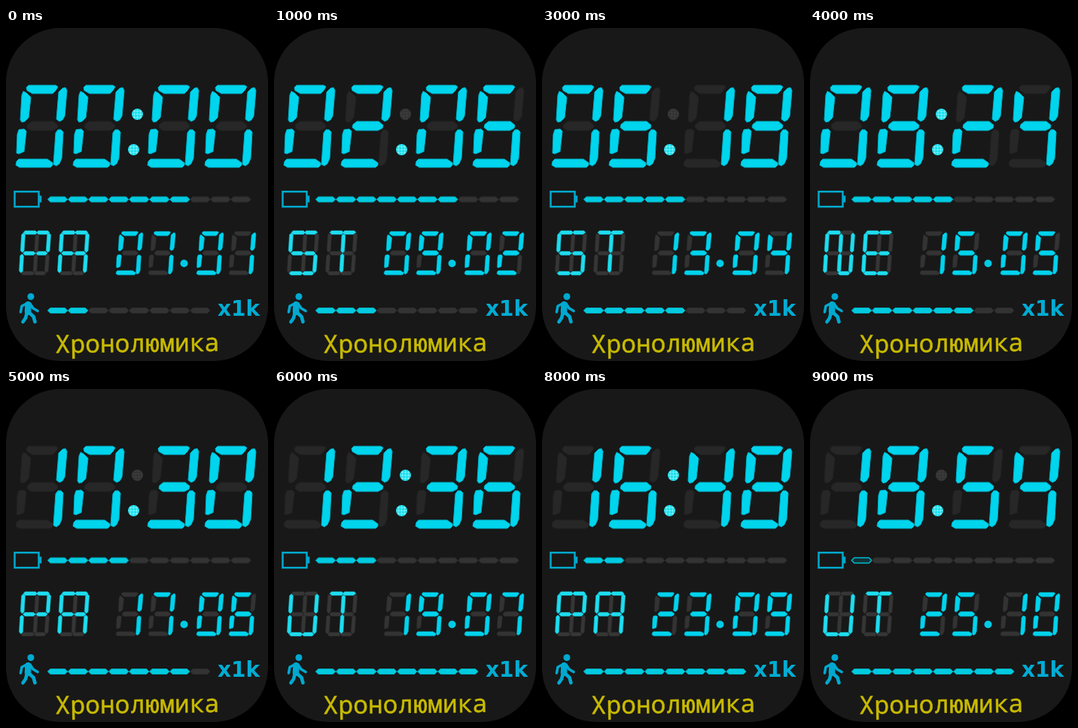
An HTML page that plays this animation: 348 px wide and 442 px high, repeating every 10000 ms.

```html
<!DOCTYPE html>
<html lang="ru">
<head>
<meta charset="utf-8">
<title>Watch face</title>
<style>
html, body { margin: 0; width: 100%; height: 100%; overflow: hidden; background: #000; }
svg { display: block; width: 100%; height: 100%; }
.big, .small, .bar, .letter { stroke-linejoin: round; stroke-width: 1; }
.big { fill: #272727; stroke: #222; }
.small { fill: #333; stroke: #2b2b2b; }
.bar { fill: #333; stroke: #2b2b2b; }
.letter { fill: #363636; stroke: #2e2e2e; stroke-width: .6; }
.big.on { fill: #00d5ee; stroke: #00b2c8; }
.small.on { fill: #00d3ed; stroke: #00b0c6; }
.bar.on { fill: #00cbe0; stroke: #00a6b8; }
.letter.on { fill: #1fdcee; stroke: #10c0d2; }
.bar.low { fill: #123338; stroke: #00b9cd; stroke-width: 1.6; }
.dot { fill: #3a3a3a; }
.dot.on { fill: #1fdfee; }
.mesh { fill: none; stroke: #000; stroke-opacity: .12; stroke-width: 1; }
.on + .mesh { stroke: #c8ffff; stroke-opacity: .4; }
</style>
</head>
<body>
<svg id="face" viewBox="0 0 348 442">
  <rect width="348" height="442" fill="#000"/>
  <rect width="348" height="442" rx="72" fill="#181818"/>
  <g fill="none" stroke="#00a9cd" stroke-width="2.500">
    <rect x="11.500" y="217.200" width="32" height="20"/>
    <path d="M45.500 222.500V231.500" stroke-width="3.500"/>
  </g>
  <g fill="none" stroke="#00a9d0" stroke-linecap="round" stroke-linejoin="round">
    <circle cx="33" cy="356.500" r="4.500" fill="#00a9d0" stroke="none"/>
    <path d="M29.500 367L29 377" stroke-width="8.500"/>
    <path d="M28 365.500L21 369L19.500 377M32 366L36 372L42 375.500" stroke-width="3.600"/>
    <path d="M31 378L36.500 383L38.500 390M27.500 379L26 385L22.500 390" stroke-width="4.600"/>
  </g>
  <text x="281" y="382" fill="#00acd3" font-size="28" font-weight="700" font-family="'DejaVu Sans', sans-serif">x1k</text>
  <text x="174.500" y="430" transform="rotate(-.6 174 430)" text-anchor="middle" fill="#c9bb00" stroke="#c9bb00" stroke-width=".5" font-size="33" font-family="'Noto Sans Mono', 'DejaVu Sans Mono', monospace">Хронолюмика</text>
</svg>
<script>
const NS = 'http://www.w3.org/2000/svg';
const face = document.getElementById('face');

const SEGMENTS = {
  a: '17,1 53,1 56,3 53,8 49,12 22,12 15,8 14,4',
  b: '62,5 66,4 68,8 65,42 62,47 58,49 54,46 57,10',
  c: '56,60 60,60 63,63 61,98 58,105 54,108 50,106 53,64',
  d: '4,99 42,99 49,104 49,107 46,110 5,110 0,107 1,102',
  e: '4,60 11,59 14,62 11,89 4,92 1,91 2,66',
  f: '10,9 14,11 20,17 17,44 12,49 8,50 6,47 8,14',
  g: '21,49 50,49 56,54 55,58 49,61 20,61 15,57 16,53'
};
const DIGITS = ['abcdef', 'bc', 'abdeg', 'abcdg', 'bcfg', 'acdfg', 'acdefg', 'abc', 'abcdefg', 'abcdfg'];

// Letter strokes: x1, y1, x2, y2; horizontal bars come in halves
const STROKES = {
  a: [5, 2.5, 23.5, 2.5], k: [22.5, 2.5, 40, 2.5],
  b: [39.3, 3, 37.5, 29], c: [37.3, 31, 35.5, 56],
  d: [2, 56.5, 20, 56.5], l: [19, 56.5, 35, 56.5],
  e: [3.2, 31, 1.8, 56], f: [5.2, 3, 3.5, 29],
  g: [4.5, 30, 21, 30], h: [20.5, 30, 37, 30],
  i: [23.6, 4, 22, 29.5], j: [21.9, 30.5, 20.3, 55.5]
};
const LETTERS = {
  P: 'akbefgh', A: 'akbcefgh', S: 'akcdlfgh', T: 'akij',
  N: 'aefijlbc', E: 'akdlefgh', U: 'bcdlef'
};
const DAYS = ['NE', '', 'UT', 'ST', '', 'PA', ''];

function add(tag, attrs, parent = face) {
  const el = document.createElementNS(NS, tag);
  for (const key in attrs) el.setAttribute(key, attrs[key]);
  return parent.appendChild(el);
}

// A bar with bevelled ends
function spike(x1, y1, x2, y2, width) {
  const len = Math.hypot(x2 - x1, y2 - y1), h = width / 2;
  const ux = (x2 - x1) / len, uy = (y2 - y1) / len;
  const at = (along, side) =>
    (x1 + ux * along - uy * side).toFixed(2) + ',' + (y1 + uy * along + ux * side).toFixed(2);
  return [at(0, 0), at(h, -h), at(len - h, -h), at(len, 0), at(len - h, h), at(h, h)].join(' ');
}

function glyph(shapes, cls, transform) {
  const g = add('g', { transform });
  const parts = {};
  for (const key in shapes) parts[key] = add('polygon', { class: cls, points: shapes[key] }, g);
  return parts;
}

function show(parts, lit) {
  for (const key in parts) parts[key].classList.toggle('on', lit.includes(key));
}

function bars(count, y) {
  return Array.from({ length: count }, (_, i) => {
    const x = 55 + 27.05 * i;
    return add('polygon', { class: 'bar', points: spike(x + .3, y, x + 26.8, y, 7) });
  });
}

function dot(cx, cy) {
  const el = add('circle', { class: 'dot', cx, cy, r: 7.5 });
  add('path', {
    class: 'mesh',
    d: [-4, 0, 4].map(o => {
      const s = Math.sqrt(49 - o * o);
      return `M${cx + o} ${cy - s}V${cy + s}M${cx - s} ${cy + o}H${cx + s}`;
    }).join('')
  });
  return el;
}

const clock = [13, 89, 188, 264].map(x => glyph(SEGMENTS, 'big', `translate(${x} 75)`));
const date = [146, 189, 253, 296].map(x => glyph(SEGMENTS, 'small', `translate(${x} 269.5) scale(.53)`));
const strokes = {};
for (const key in STROKES) strokes[key] = spike(...STROKES[key], 4.8);
const day = [18, 69].map(x => glyph(strokes, 'letter', `translate(${x} 269)`));
const battery = bars(10, 227.5);
const steps = bars(8, 375);
const topDot = dot(174.5, 114.5);
dot(169.5, 161.5).classList.add('on');
add('circle', { cx: 236.5, cy: 312.5, r: 5, fill: '#00cbe4' });

const pad = n => String(n).padStart(2, '0');

function render(k) {
  const time = pad(2 * k) + pad(6 * k);
  const when = pad(7 + 2 * k) + pad(k + 1);
  const name = DAYS[new Date(2022, k, 7 + 2 * k).getDay()];
  const charge = Math.floor(7.8 - .67 * k);
  clock.forEach((parts, i) => show(parts, DIGITS[time[i]]));
  date.forEach((parts, i) => show(parts, DIGITS[when[i]]));
  day.forEach((parts, i) => show(parts, LETTERS[name[i]]));
  battery.forEach((el, i) => el.classList.toggle('on', charge > 1 && i < charge));
  battery[0].classList.toggle('low', charge === 1);
  steps.forEach((el, i) => el.classList.toggle('on', i < k + 2));
  topDot.classList.toggle('on', k % 2 === 0);
}

const start = performance.now();
let last = -1;
function tick() {
  const k = Math.floor((performance.now() - start) / 1000) % 10;
  if (k !== last) render(last = k);
  requestAnimationFrame(tick);
}
tick();
</script>
</body>
</html>
```
